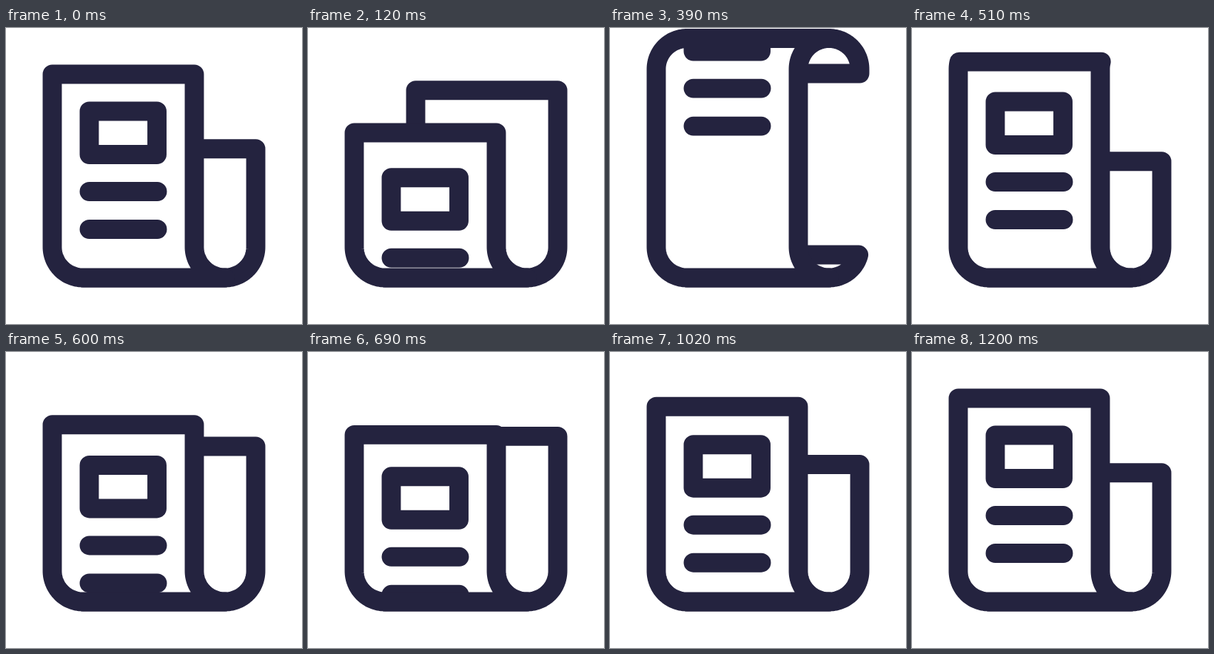
An HTML page with a canvas that plays this animation: 400 by 400 pixels, repeating every 1.23 s.

```html
<!DOCTYPE html>
<html lang="en">
<head>
<meta charset="utf-8">
<title>Rolling newspaper</title>
<style>
  html, body { margin: 0; width: 100%; height: 100%; overflow: hidden; background: #fff; }
  canvas { display: block; width: 100vmin; height: 100vmin; }
</style>
</head>
<body>
<canvas width="400" height="400"></canvas>
<script>
const ctx = document.querySelector('canvas').getContext('2d');
const INK = '#24233f', LOOP_MS = 1230, STEP_MS = 30;

// The sheet runs round a belt: down the front, up the back.
const R = 41.5, TOP = 55.5, BOTTOM = 296, CENTER = 104, WIDTH = 192;
const SIDE = BOTTOM - TOP, ARC = Math.PI * R, LAP = 2 * (SIDE + ARC);
const SHEET = 496.6, START = 7;

// [time, travel, speed]
const KEYS = [
  [0, 0, 0], [120, 79, 1.5], [270, 382, 2.15], [510, LAP - 17, 0.65],
  [660, LAP + 50, 0], [870, LAP + 30, -0.13], [1200, LAP, 0], [LOOP_MS, LAP, 0]
];

function travelAt(t) {
  const i = KEYS.findIndex((key, n) => n && t <= key[0]);
  const [t0, s0, v0] = KEYS[i - 1], [t1, s1, v1] = KEYS[i];
  const d = t1 - t0, p = (t - t0) / d, q = 1 - p;
  return q * q * ((1 + 2 * p) * s0 + p * d * v0) +
         p * p * ((3 - 2 * p) * s1 - q * d * v1);
}

function beltPoint(u) {
  const v = ((u % LAP) + LAP) % LAP, half = SIDE + ARC;
  const sign = v < half ? 1 : -1, w = v % half;
  let x = -R, y = w - SIDE / 2;
  if (w > SIDE) {
    const a = (w - SIDE) / R;
    x = -R * Math.cos(a);
    y = SIDE / 2 + R * Math.sin(a);
  }
  return [CENTER + sign * x, (TOP + BOTTOM) / 2 + sign * y];
}

function sheetPath(from, to) {
  const n = Math.max(1, Math.ceil((to - from) / 2));
  const edge = Array.from({ length: n + 1 }, (_, i) => beltPoint(from + (to - from) * i / n));
  ctx.beginPath();
  edge.forEach(([x, y]) => ctx.lineTo(x, y));
  edge.reverse().forEach(([x, y]) => ctx.lineTo(x + WIDTH, y));
  ctx.closePath();
}

function drawArticle(shift) {
  ctx.beginPath();
  ctx.rect(112.5, 112.5 + shift, 91.5, 58.5);
  for (const y of [221, 272]) {
    ctx.moveTo(112.5, y + shift);
    ctx.lineTo(204.5, y + shift);
  }
  ctx.stroke();
}

function articleShift(travel) {
  if (travel < LAP / 2) return 1.136 * travel;
  const rest = travel - LAP;
  return rest < 0 ? rest + Math.min(4, -rest * 4 / 17) : 1.13 * rest;
}

function draw(t) {
  const travel = travelAt(t), first = START + travel, last = first + SHEET;
  ctx.fillStyle = '#fff';
  ctx.fillRect(0, 0, 400, 400);
  ctx.strokeStyle = INK;
  ctx.lineWidth = 25.9;
  ctx.lineJoin = ctx.lineCap = 'round';

  // Odd halves of the belt are the back, even ones the front.
  for (const half of [1, 3, 0, 2, 4]) {
    const begin = half * LAP / 2 - ARC / 2;
    const from = Math.max(first, begin), to = Math.min(last, begin + LAP / 2);
    if (to <= from) continue;
    sheetPath(from, to);
    ctx.fill();
    if (half % 2 === 0) {
      ctx.save();
      ctx.clip();
      drawArticle(articleShift(travel));
      ctx.restore();
      sheetPath(from, to);
    }
    ctx.stroke();
  }
}

function tick() {
  const t = performance.now() % LOOP_MS;
  draw(Math.floor(t / STEP_MS) * STEP_MS);
  requestAnimationFrame(tick);
}
tick();
</script>
</body>
</html>
```
